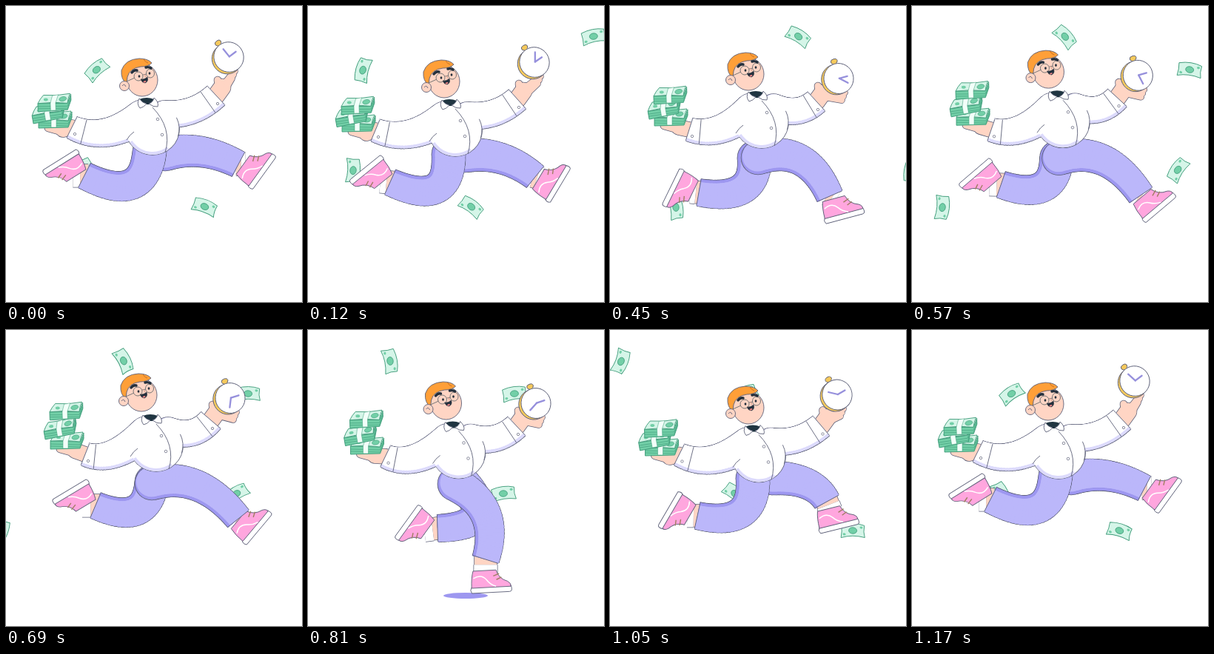
An HTML page with a canvas for the animation above (1200 ms loop, 400 by 400 pixels).

```html
<!DOCTYPE html>
<html>
<head>
<meta charset="utf-8">
<style>
html, body { margin: 0; width: 100%; height: 100%; overflow: hidden; background: #fff }
canvas { display: block }
</style>
</head>
<body>
<canvas id="stage" width="400" height="400"></canvas>
<script>
const c = document.getElementById('stage').getContext('2d');
const LOOP = 1200, TAU = Math.PI * 2, RAD = Math.PI / 180;
const INK = '#5d6078', SKIN = '#ffd5c4', MINT = '#d5f5e8', GREEN = '#72cfa7', TEAL = '#3f9c7a';
const LILAC = '#bbb7fa', VIOLET = '#9d97f0', SHADE = '#dcdafc', PINK = '#ffa6de', GOLD = '#f5c95c';

// Close a track with its first pose, held over the end of the loop.
const track = rows => [...rows, [1170, ...rows[0].slice(1)]];

// time, hip xy, knee control xy, cuff xy, foot xy, foot angle
const nearLeg = track([
  [0, 194, 197, 186, 270, 106, 229, 93, 229, 148],
  [120, 190, 200, 193, 275, 111, 238, 100, 237, 141],
  [300, 197, 215, 280, 268, 180, 281, 167, 283, 129],
  [450, 200, 205, 266, 185, 297, 257, 304, 261, -15],
  [690, 197, 207, 262, 190, 314, 255, 316, 256, -50],
  [810, 198, 208, 262, 240, 240, 310, 240, 326, -3],
  [930, 192, 205, 220, 265, 147, 286, 139, 289, 67]
]);
const farLeg = track([
  [0, 215, 200, 263, 187, 314, 214, 322, 214, -54],
  [120, 212, 202, 264, 196, 307, 231, 313, 233, -59],
  [240, 213, 212, 262, 235, 252, 306, 256, 321, -12],
  [300, 215, 215, 259, 260, 211, 313, 211, 328, 0],
  [450, 195, 205, 199, 266, 120, 252, 111, 251, 116],
  [690, 197, 205, 191, 267, 121, 237, 106, 237, 149],
  [810, 210, 208, 262, 265, 175, 268, 160, 270, 126],
  [930, 222, 200, 288, 224, 250, 257, 246, 270, 57]
]);
// time, head, collar, left elbow, left cuff, right elbow, right cuff, money, lift, watch, tilt
const upper = track([
  [0, 184, 100, 190, 129, 133, 186, 89, 164, 254, 149, 284, 121, 66, 155, 23, 301, 69, -37],
  [120, 184, 102, 191, 131, 136, 187, 91, 168, 254, 152, 283, 126, 68, 160, 24, 306, 76, -34],
  [300, 190, 117, 197, 145, 144, 199, 103, 183, 257, 173, 286, 147, 75, 176, 26, 312, 117, -21],
  [450, 187, 92, 197, 120, 148, 180, 107, 167, 255, 151, 279, 129, 82, 152, 30, 309, 98, -15],
  [690, 183, 88, 195, 119, 142, 182, 107, 168, 254, 149, 277, 122, 82, 151, 40, 303, 92, -18],
  [930, 190, 110, 196, 138, 140, 194, 100, 173, 256, 162, 287, 138, 75, 165, 30, 313, 106, -21]
]);

// Periodic monotone cubic through the rows of a track.
function pose(rows, t) {
  const n = rows.length;
  const time = j => rows[(j + n) % n][0] + LOOP * Math.floor(j / n);
  let i = n - 1;
  while (rows[i][0] > t) i--;
  const h = time(i + 1) - time(i), u = (t - time(i)) / h;
  return rows[0].slice(1).map((_, k) => {
    const val = j => rows[(j + n) % n][k + 1];
    const slope = j => (val(j + 1) - val(j)) / (time(j + 1) - time(j));
    const tangent = j => {
      const a = slope(j - 1), b = slope(j);
      return a * b <= 0 ? 0 : 2 * a * b / (a + b);
    };
    const a = val(i), b = val(i + 1), s = u * u * (3 - 2 * u);
    return a + (b - a) * s + h * u * (1 - u) * ((1 - u) * tangent(i) - u * tangent(i + 1));
  });
}

function paint(fill, line, width = 0.9) {
  if (fill) { c.fillStyle = fill; c.fill(); }
  if (line) { c.strokeStyle = line; c.lineWidth = width; c.stroke(); }
}
function shape(d, ...style) {
  const p = new Path2D(d);
  if (style[0]) { c.fillStyle = style[0]; c.fill(p); }
  if (style[1]) { c.strokeStyle = style[1]; c.lineWidth = style[2] || 0.9; c.stroke(p); }
}
function oval(x, y, rx, ry, turn, ...style) {
  c.beginPath();
  c.ellipse(x, y, rx, ry, turn, 0, TAU);
  paint(...style);
}
function bar(x1, y1, x2, y2, color, width) {
  c.beginPath();
  c.moveTo(x1, y1);
  c.lineTo(x2, y2);
  paint(null, color, width);
}
function at(x, y, degrees, draw) {
  c.save();
  c.translate(x, y);
  c.rotate(degrees * RAD);
  draw();
  c.restore();
}

// Tapered tube along a quadratic curve; side says which edge is shaded.
function limb(ax, ay, qx, qy, bx, by, w0, w1, side) {
  const N = 28;
  const point = i => {
    const u = Math.min(N, Math.max(0, i)) / N, v = 1 - u;
    const tx = v * (qx - ax) + u * (bx - qx), ty = v * (qy - ay) + u * (by - qy);
    const len = Math.hypot(tx, ty) || 1;
    return { x: v * v * ax + 2 * u * v * qx + u * u * bx, y: v * v * ay + 2 * u * v * qy + u * u * by,
      nx: -ty / len, ny: tx / len, w: w0 + (w1 - w0) * u };
  };
  function pass(color, grow, shift = 0) {
    const s = point(0);
    oval(s.x + s.nx * shift, s.y + s.ny * shift, (s.w + grow) / 2, (s.w + grow) / 2, 0, color);
    for (let i = 1; i <= N; i++) {
      const p = point(i - 1), q = point(i + 1);
      bar(p.x + p.nx * shift, p.y + p.ny * shift, q.x + q.nx * shift, q.y + q.ny * shift, color, point(i).w + grow);
    }
  }
  return {
    outline: () => pass(INK, 1.7),
    fill(light, dark) { pass(dark, 0); pass(light, -4, -2 * side); },
    rib(i) {
      const p = point(i), r = p.w / 2;
      bar(p.x - p.nx * r, p.y - p.ny * r, p.x + p.nx * r, p.y + p.ny * r, INK, 0.9);
    },
    end: N
  };
}

function shoe() {
  shape('M-20 21L33 20Q36 29 31 29L-20 29Q-23 25-20 21Z', '#fff', INK);
  shape('M-17-1L14-1Q17 11 29 15Q34 18 33 22L-20 22Q-20 8-17-1Z', PINK, INK);
  shape('M-17 9Q-6 3 1 12Q5 18 13 21', null, '#fff', 1.5);
  shape('M10 7L18 4M14 12L21 9', null, '#a17e62', 1.4);
}

function leg([hx, hy, kx, ky, x, y, fx, fy, angle]) {
  const dx = fx - x, dy = fy - y, mx = x + dx * .45, my = y + dy * .45;
  bar(x - dx * .4, y - dy * .4, fx, fy, INK, 31.5);
  bar(x - dx * .4, y - dy * .4, fx, fy, SKIN, 30);
  bar(mx, my, fx + dx * .2, fy + dy * .2, INK, 33);
  bar(mx, my, fx + dx * .2, fy + dy * .2, '#fff', 31.5);
  at(fx, fy, angle, shoe);
  const tube = limb(hx, hy, kx, ky, x, y, 45, 36, 1);
  tube.outline();
  tube.fill(LILAC, VIOLET);
  tube.rib(tube.end);
}

function bill() {
  shape('M-16-7Q0-13 15-9Q14 0 17 7Q0 4-15 10Q-14 1-16-7Z', MINT, TEAL);
  oval(0, -1, 5.5, 4.2, 0, GREEN, TEAL, 0.8);
  oval(-11, 5, 2, 1.6, 0, GREEN);
  oval(11, -6, 2, 1.6, 0, GREEN);
}

// Bills drift left at a steady speed; spin depends on how far they have gone.
function bills(t) {
  const lanes = [[42, 434, x => (400 - x) * .33 - 12], [87, 123, x => x > 140 ? (x - 300) * .17 : (x - 176) * .7],
    [272, 268, x => (374 - x) * .33 - 10], [222, 108, x => 100 - (x - 57) * .5]];
  for (const [y, start, spin] of lanes) {
    const x = ((start - .4 * t + 40) % 480 + 480) % 480 - 40;
    at(x, y, spin(x), bill);
  }
}

function bundle() {
  shape('M-22-1L18 0L23-12L23-4L18 9L-22 10Z', GREEN, TEAL);
  shape('M-22 3L18 4L23-9M-22 6L18 7L23-6', null, TEAL, 0.6);
  shape('M-22-1Q-19-7-14-12Q4-10 22-13Q19-7 18 0Q-2-3-22-1Z', MINT, TEAL);
  oval(-11, -6, 3, 2, 0, GREEN);
  oval(12, -6, 5, 3, -.2, GREEN, TEAL, 0.6);
  shape('M-2-11L6-12L2-1L2 9L-5 9L-5-1Z', '#f2fff9', TEAL, 0.5);
}

function money(x, y, lift) {
  at(x, y, 0, bundle);
  at(x - 9, y - lift * .42, -10, bundle);
  at(x - 1, y - lift, -2, bundle);
}

function leftHand(x, y, mx, my) {
  c.lineCap = c.lineJoin = 'round';
  for (const [color, grow] of [[INK, 1.6], [SKIN, 0]]) {
    bar(x, y, mx + 11, my + 12, color, 20 + grow);
    bar(mx + 9, my + 15, mx - 9, my + 10, color, 9 + grow);
  }
  c.lineCap = 'butt';
}

function rightHand(x, y, wx, wy) {
  const px = x + 8, py = y - 11, fx = wx + 5, fy = wy + 24;
  c.lineCap = 'round';
  for (const [color, grow] of [[INK, 1.6], [SKIN, 0]]) {
    bar(x, y, px, py, color, 23 + grow);
    bar(px - 5, py - 2, px - 6, py - 10, color, 9 + grow);
    for (const k of [-1, 0, 1]) bar(px + 3, py + k * 5, fx + 1 - k * 2, fy + k * 5, color, 8 + grow);
  }
  c.lineCap = 'butt';
}

function watch(t) {
  oval(0, -24, 4.5, 3.2, 0, GOLD, INK);
  c.fillStyle = GOLD;
  c.fillRect(-2, -23, 4, 5);
  oval(-3.5, .5, 20, 20.5, 0, GOLD, INK);
  oval(0, 0, 20, 20.5, 0, '#fff', INK);
  c.lineCap = 'round';
  const a = (.3 * t - 92) * RAD;
  bar(1, 0, 1 + 13 * Math.cos(a), 13 * Math.sin(a), '#9690dc', 2.3);
  bar(1, 0, 12, 0, '#9690dc', 2.3);
  c.lineCap = 'butt';
}

function head() {
  oval(0, 0, 21, 22, 0, SKIN, INK);
  shape('M-21 5Q-29-1-28-13Q-23-28-4-29Q8-29 13-23Q8-18-2-18Q-17-16-20-4Z', '#ff9f38', INK);
  shape('M2-28Q4-24 8-23', null, '#c66d1e');
  oval(-24, 8, 6.5, 6.5, 0, SKIN, INK);
  shape('M-27 8Q-24 4-22 9', null, INK);
  shape('M-21 2L-10-3M1-7L6-8', null, '#777', 1);
  oval(-5, -5, 6, 6, 0, null, '#777', 1);
  oval(11, -9, 5.5, 6, 0, null, '#777', 1);
  oval(-4, -5, 1.4, 1.8, 0, '#24303d');
  oval(10, -9, 1.4, 1.8, 0, '#24303d');
  c.lineCap = 'round';
  shape('M-14-10Q-11-14-7-13M5-17Q9-18 12-16', null, '#24303d', 3.4);
  c.lineCap = 'butt';
  shape('M-2-1Q3 0 7-4Q9 2 4 4Q0 4-2-1Z', '#24303d', '#24303d', 0.6);
  oval(3.5, 2.3, 2, 1, -.3, '#f58a8a');
  shape('M2-8Q6-6 4-4', SKIN, '#c98b7c', 0.8);
}

function torso(x, y, lx, ly, lcx, lcy, rx, ry, rcx, rcy) {
  const left = limb(x - 6, y + 20, lx, ly, lcx, lcy, 44, 31, -1);
  const right = limb(x + 24, y + 17, rx, ry, rcx, rcy, 36, 34, 1);
  const belly = (grow, color) => oval(x + 8, y + 37, 36 + grow, 35 + grow, 0, color);
  left.outline(); right.outline(); belly(.85, INK);
  left.fill('#fff', SHADE); right.fill('#fff', SHADE); belly(0, '#fff');
  oval(x - 2, y + 19, 21, 20, 0, '#fff');
  for (const arm of [left, right]) { arm.rib(arm.end); arm.rib(arm.end - 5); }
  oval(lcx + 4, lcy + 9, 1.7, 1.7, 0, '#fff', INK, 0.7);
  oval(rcx + 2, rcy + 11, 1.7, 1.7, 0, '#fff', INK, 0.7);
  c.beginPath();
  c.ellipse(x + 8, y + 37, 34, 33, 0, .9, 2.6);
  paint(null, SHADE, 4);
  c.beginPath();
  c.ellipse(x + 8, y + 37, 36, 35, 0, -.45, .3);
  paint(null, INK, 0.9);
  at(x, y, 0, () => {
    shape('M-27 52Q-23 45-17 41M8 8Q35 36 25 69', null, INK);
    oval(15, 24, 1.8, 1.8, 0, '#fff', INK, 0.7);
    oval(21, 45, 1.8, 1.8, 0, '#fff', INK, 0.7);
    shape('M-10-3Q0-7 10-3L5 4L-4 4Z', '#203541');
    shape('M-10-4Q-14 3-9 9Q-4 8 0 3Q-6 2-10-4Z', '#fff', INK);
    shape('M10-5Q17 1 15 7Q9 8 3 3Q9 1 10-5Z', '#fff', INK);
  });
}

function draw(t) {
  c.clearRect(0, 0, 400, 400);
  const near = pose(nearLeg, t), far = pose(farLeg, t);
  const [hx, hy, kx, ky, lx, ly, lcx, lcy, rx, ry, rcx, rcy, mx, my, lift, wx, wy, tilt] = pose(upper, t);
  const contact = Math.min(1, Math.max(0, (Math.max(near[7], far[7]) - 292) / 34));
  if (contact) oval(213, 359, 30 * contact, 4 * contact, 0, VIOLET);
  bills(t);
  leg(far);
  leg(near);
  leftHand(lcx, lcy, mx, my);
  money(mx, my, lift);
  rightHand(rcx, rcy, wx, wy);
  torso(kx, ky, lx, ly, lcx, lcy, rx, ry, rcx, rcy);
  at(hx, hy, 0, head);
  at(wx, wy, tilt, () => watch(t));
}

function tick() {
  draw(Math.floor(performance.now() % LOOP / 30) * 30);
  requestAnimationFrame(tick);
}
tick();
</script>
</body>
</html>
```
